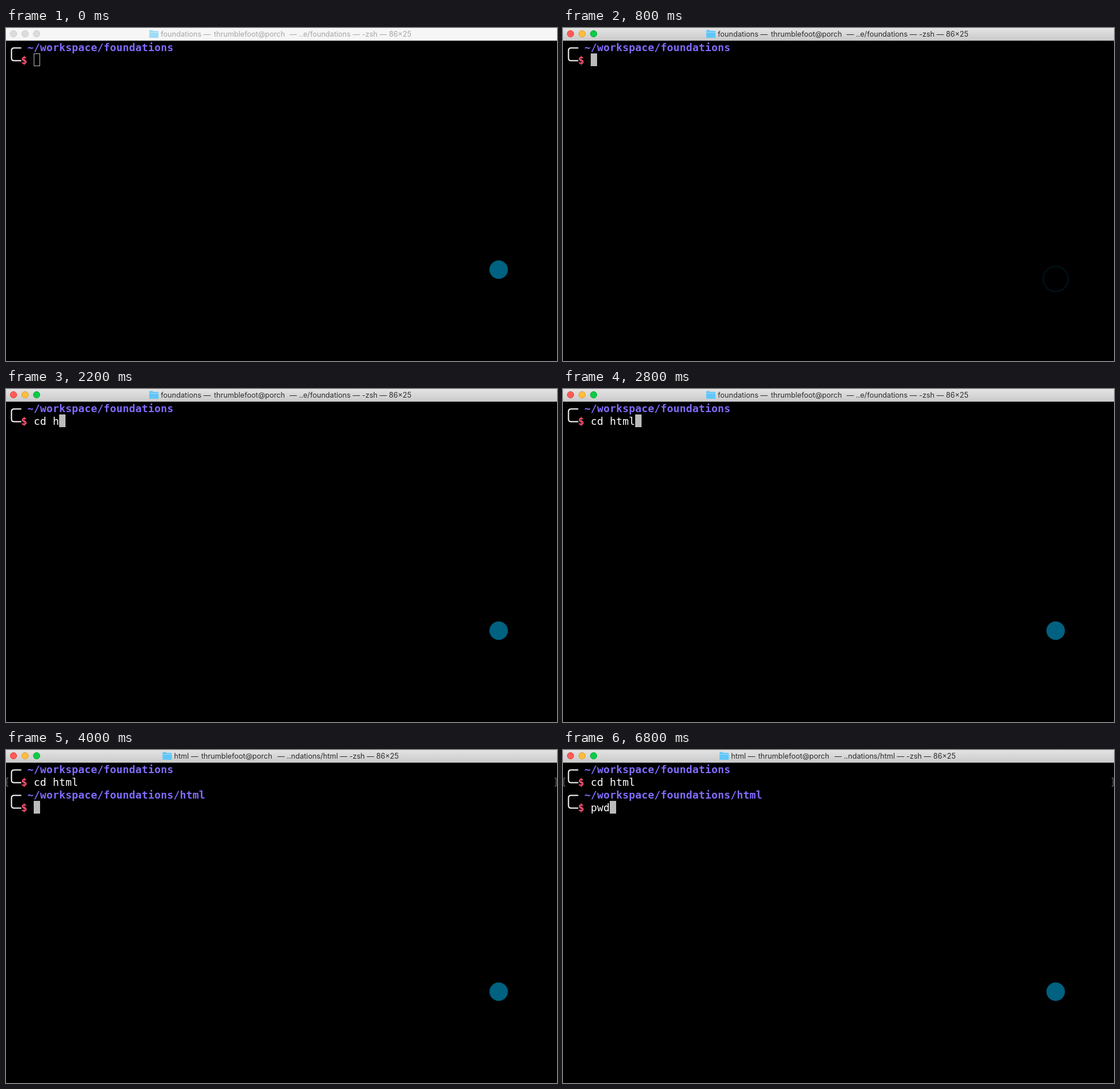
An HTML page that plays this animation: 954 by 576 pixels, repeating every 8000 ms.

```html
<!DOCTYPE html>
<html lang="en">
<head>
<meta charset="utf-8">
<title>Terminal</title>
<style>
  html, body { margin: 0; width: 100%; height: 100%; overflow: hidden; background: #000; }
  svg { display: block; width: 100%; height: 100%; }
  text { white-space: pre; }
  .term { font: 18px "DejaVu Sans Mono", monospace; letter-spacing: .163px; fill: #fff; }
  .path { font-weight: bold; fill: #806cff; }
  .sign { font-weight: bold; fill: #ff5474; }
  .title { font: 12.6px Inter, sans-serif; }
</style>
</head>
<body>
<svg viewBox="0 0 954 576">
  <defs>
    <linearGradient id="metal" x2="0" y2="1">
      <stop offset="0" stop-color="#e3e3e3"/>
      <stop offset="1" stop-color="#cbcbcb"/>
    </linearGradient>
  </defs>
  <rect width="954" height="576"/>
  <rect id="bar" width="954" height="21"/>
  <rect id="edge" y="21" width="954" height="1"/>
  <g id="lights"></g>
  <g id="title" class="title">
    <g id="folder">
      <path d="M0 5q0-1.500 1.500-1.500h4l1.500 1.500h7.500q1.500 0 1.500 1.500v9q0 1.500-1.500 1.500h-13q-1.500 0-1.500-1.500z"/>
      <path d="M.5 7.500h15" fill="none" stroke="#fff" stroke-opacity=".4"/>
    </g>
    <text id="dir" x="20" y="15"></text>
    <text id="user" y="15">thrumblefoot@porch</text>
    <text id="rest" y="15" text-anchor="end"></text>
  </g>
  <g id="first"></g>
  <g id="second"></g>
  <path id="marks" d="M4 48.500H1.500v14H4M950 48.500h2.500v14H950" fill="none" stroke="#858585"/>
  <rect id="cursor" width="11" height="22"/>
  <circle id="pointer" cx="853" cy="418" r="16" fill="#006180"/>
  <circle id="ring" cx="853" cy="434" fill="none" stroke="#06405a" stroke-width="2.500"/>
</svg>
<script>
const LOOP = 8000, COL = 11, ROW = 22, LEFT = 4;
const $ = id => document.getElementById(id);
const set = (el, attrs) => {
  for (const k in attrs) el.setAttribute(k, attrs[k]);
};
const show = (el, on) => set(el, { display: on ? "inline" : "none" });

// [time, text on the command line from then on]
const CD = [[1400, "c"], [1600, "cd "], [2200, "cd h"], [2400, "cd ht"], [2600, "cd htm"], [2800, "cd html"]];
const PWD = [[6000, "p"], [6400, "pw"], [6800, "pwd"]];
const typed = (steps, t) => steps.reduce((s, [at, text]) => t >= at ? text : s, "");

const LIGHTS = ["#ff5b57", "#febd3e", "#0bcb47"];
const RIMS = ["#e2463f", "#dfa023", "#08ae34"];
$("lights").innerHTML = LIGHTS.map((_, i) => `<circle cx="${13 + 20 * i}" cy="10" r="5.6"/>`).join("");

function prompt(id, row, path) {
  const y = (row + 1) * ROW;
  $(id).innerHTML =
    `<path d="M26.500 ${y + 12.5}H14q-4.500 0-4.500 4.500v13q0 4.500 4.500 4.500h12.500" fill="none" stroke="#fff" stroke-width="2"/>
    <text class="term path" x="${LEFT + 3 * COL}" y="${y + 18}">${path}</text>
    <text class="term sign" x="${LEFT + 2 * COL}" y="${y + 40}">$</text>
    <text class="term line" x="${LEFT + 4 * COL}" y="${y + 40}"></text>`;
  return $(id).querySelector(".line");
}
const line1 = prompt("first", 0, "~/workspace/foundations");
const line2 = prompt("second", 2, "~/workspace/foundations/html");

function drawTitle(t, active) {
  const inHtml = t >= 4000;
  const x = inHtml ? 271 : 248;
  set($("title"), { transform: `translate(${x})`, fill: active ? "#2c2c2c" : "#a6a6a6" });
  set($("folder"), { fill: active ? "#62c6f8" : "#9fdcf8" });
  set($("user"), { x: inHtml ? 67 : 112 });
  set($("rest"), { x: inHtml ? 409 : 454 });
  $("dir").textContent = (inHtml ? "html" : "foundations") + " —";
  $("rest").textContent = `— ${t >= 3800 ? "..ndations/html" : "..e/foundations"} — -zsh — 86×25`;
}

function drawBar(active) {
  set($("bar"), { fill: active ? "url(#metal)" : "#f6f6f6" });
  set($("edge"), { fill: active ? "#b5b5b5" : "#d8d8d8" });
  [...$("lights").children].forEach((c, i) => set(c, {
    fill: active ? LIGHTS[i] : "#dcdcdc",
    stroke: active ? RIMS[i] : "#cbcbcb"
  }));
}

function drawPointer(t) {
  const clicked = t >= 400 && t < 1000;
  const step = Math.floor((t - 400) / 200);
  show($("pointer"), !clicked);
  show($("ring"), clicked);
  if (clicked) set($("ring"), { r: 19.8 + step * 0.9, opacity: 0.75 - step * 0.24 });
}

function render(t) {
  const active = t >= 400, entered = t >= 3800;
  const cd = typed(CD, t), pwd = typed(PWD, t);
  drawBar(active);
  drawTitle(t, active);
  line1.textContent = cd;
  line2.textContent = pwd;
  show($("second"), entered);
  show($("marks"), entered);

  const inset = active ? 0 : 0.5;
  set($("cursor"), {
    x: LEFT + (4 + (entered ? pwd : cd).length) * COL + inset,
    y: (entered ? 4 : 2) * ROW + inset,
    width: COL - 2 * inset,
    height: ROW - 2 * inset,
    fill: active ? "#bbb" : "none",
    stroke: active ? "none" : "#bbb"
  });
  drawPointer(t);
}

const start = performance.now();
function tick() {
  render((performance.now() - start) % LOOP);
  requestAnimationFrame(tick);
}
tick();
</script>
</body>
</html>
```
